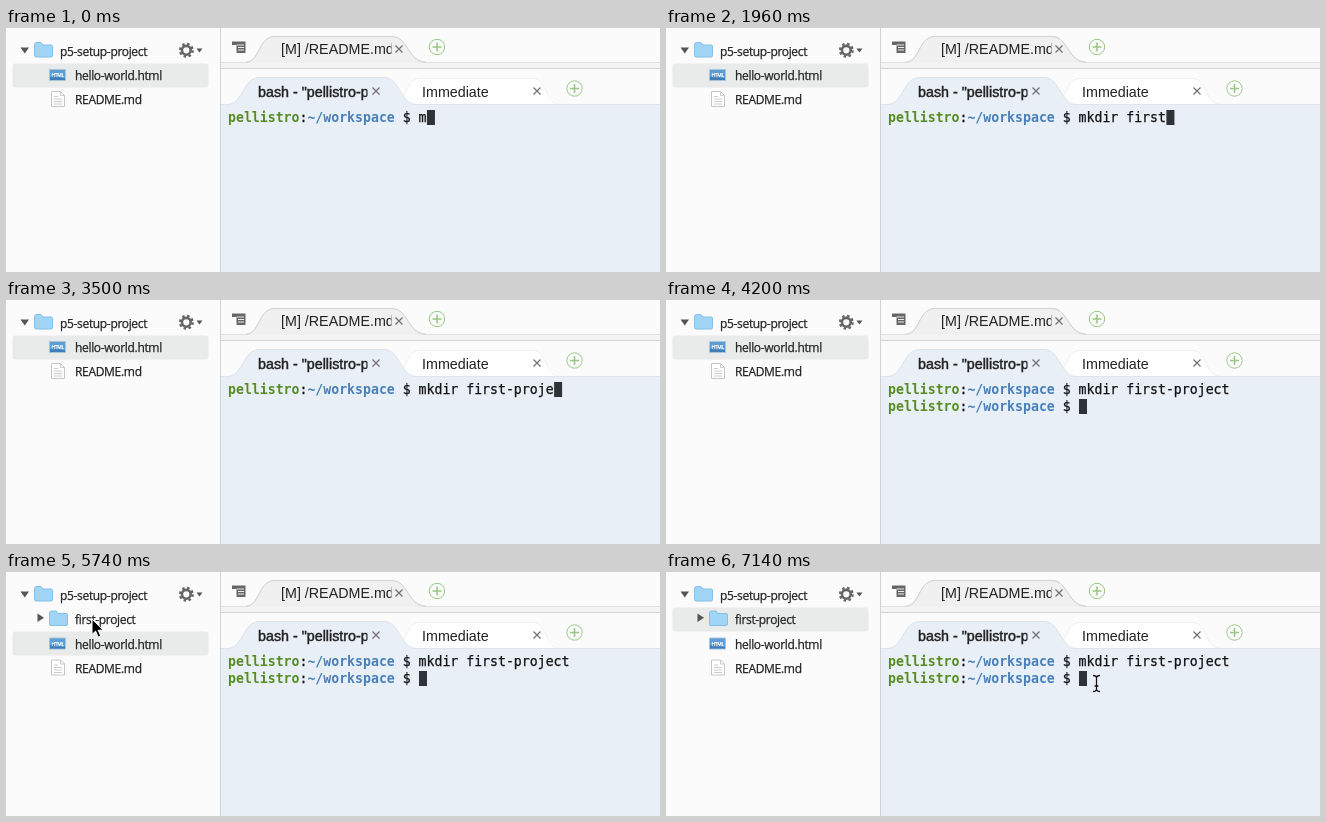
These frames come from a looping animation (654x244 px, 8 s). An HTML page:

```html
<!DOCTYPE html>
<html lang="en">
<head>
<meta charset="utf-8">
<title>Making a project folder</title>
<style>
html, body { margin: 0; width: 100%; height: 100%; overflow: hidden; background: #fbfbfb; }
svg { display: block; width: 654px; height: 244px; }
text { white-space: pre; fill: #222; }
.tree { font: 12px "Open Sans", "Noto Sans", sans-serif; letter-spacing: -.33px; }
.tree text { stroke: currentColor; stroke-width: .25px; color: #222; }
.tabs { font: 14.3px "Liberation Sans", Arial, sans-serif; }
.term { font: 13.2px "DejaVu Sans Mono", monospace; }
.term text { fill: #111; stroke: #111; stroke-width: .25px; }
.term .user, .term .path { font-weight: bold; stroke: none; }
.term .user { fill: #568c22; }
.term .path { fill: #4a7fb8; }
.picked text { fill: #fff; color: #fff; }
.picked path.twist { fill: #fff; }
.twist { fill: #555; }
.line { fill: none; stroke: #d2d2d2; }
</style>
</head>
<body>
<svg viewBox="0 0 654 244">
  <defs>
    <path id="folder" d="M.5 2.5q0-2 2-2h4.500l2 2.500h8q1.500 0 1.500 1.500v9q0 1.500-1.500 1.500h-15q-1.500 0-1.500-1.500z" fill="#a0d5f5" stroke="#82c0e8"/>
    <path id="close" d="M-3.500-3.500l7 7m0-7l-7 7" stroke="#707070" stroke-width="1.200"/>
    <g id="add" fill="none" stroke="#9ac785">
      <circle r="7.700"/>
      <path d="M-4.500 0h9M0-4.500v9" stroke-width="1.600"/>
    </g>
    <path id="beamShape" d="M-3.500-8Q0-8 0-5.500Q0-8 3.500-8M0-6V6M-3.500 8Q0 8 0 5.500Q0 8 3.500 8M-2 2.500h4"/>
    <clipPath id="clipTop"><path d="M270 8h115.500v26H270z"/></clipPath>
    <clipPath id="clipBash"><path d="M248 50h113.500v26H248z"/></clipPath>
  </defs>

  <path d="M0 0h654v244H0z" fill="#fbfbfb"/>

  <g class="tree">
    <rect id="mark" x="6.500" width="196" height="24" rx="3"/>
    <path class="twist" d="M14.500 19.500h8.500l-4.250 6z"/>
    <use href="#folder" x="28" y="14"/>
    <text x="54" y="27.500">p5-setup-project</text>
    <g fill="none" stroke="#666">
      <circle cx="180.300" cy="22.300" r="4.400" stroke-width="2.600"/>
      <circle cx="180.300" cy="22.300" r="6.300" stroke-width="2.400" stroke-dasharray="2.474"/>
    </g>
    <path d="M190.500 20.500h6l-3 4z" fill="#555"/>

    <g id="newRow">
      <path class="twist" d="M31.500 41.500v8.500l6.500-4.250z"/>
      <use href="#folder" x="43" y="38.500"/>
      <text x="69" y="52">first-project</text>
    </g>
    <g id="files">
      <path d="M43.500 41.500h16v11h-16z" fill="#5a9fd8" stroke="#a9c3d8"/>
      <path d="M44 49l5-2 10 3v2H44z" fill="#3b7fbf"/>
      <text x="45.500" y="49" style="font-size:5px;fill:#fff;color:#fff">HTML</text>
      <text x="69" y="52">hello-world.html</text>
      <path d="M45.500 63.500h9l4 4v11h-13z" fill="#fff" stroke="#c6c6c6"/>
      <path d="M54.500 63.500v4h4M48 68.500h4M48 71h8M48 73.500h8M48 76h8" fill="none" stroke="#ccc"/>
      <text x="69" y="76.300">README.md</text>
    </g>
  </g>

  <g class="tabs">
    <path d="M215 34h439v7H215z" fill="#f4f4f4"/>
    <path d="M215 34.500H240C254 34.500 252 8.500 269 8.500H386C402 8.500 402 34.500 420 34.500H654" fill="#f0f0f0" stroke="#e2e2e2"/>
    <path class="line" d="M240 34C254 34 252 8.500 269 8.500H386C402 8.500 402 34 420 34M215 40.500H654"/>
    <path d="M226 13.500h13.500v11.500h-9v-8h-4.500z" fill="#666"/>
    <path d="M230.500 17h7.500M232 19.500h6M232 22h6" stroke="#fbfbfb" stroke-width=".9"/>
    <text x="275" y="26" clip-path="url(#clipTop)">[M] /README.md</text>
    <use href="#close" x="393" y="21"/>
    <use href="#add" x="431" y="19"/>

    <path d="M386 76.500C402 76.500 398 50.500 414 50.500H526C542 50.500 538 76.500 556 76.500z" fill="#fff" stroke="#f0f0f0"/>
    <path d="M215 76h439v168H215z" fill="#e9eff7"/>
    <path class="line" d="M215 76.500H654" style="stroke:#dfe5eb"/>
    <path d="M215 77H221C238 77 236 49.500 254 49.500H378C394 49.500 394 77 411 77z" fill="#e9eff7"/>
    <path class="line" d="M221 76.500C238 76.500 236 49.500 254 49.500H378C394 49.500 394 76.500 411 76.500" style="stroke:#dce2e8"/>
    <text x="252" y="69" clip-path="url(#clipBash)" stroke="#222" stroke-width=".45">bash - "pellistro-project"</text>
    <text x="416" y="69">Immediate</text>
    <use href="#close" x="370" y="63"/>
    <use href="#close" x="531" y="63"/>
    <use href="#add" x="568.500" y="60.500"/>
  </g>
  <path class="line" d="M214.500 0V244"/>

  <g class="term">
    <text x="222" y="94"><tspan class="user">pellistro</tspan>:<tspan class="path">~/workspace</tspan> $ <tspan id="typed"></tspan></text>
    <text id="prompt" x="222" y="111"><tspan class="user">pellistro</tspan>:<tspan class="path">~/workspace</tspan> $ </text>
    <rect id="caret"/>
  </g>

  <path id="arrow" d="M0 0v15.500l3.600-3.400 2.600 6 2.600-1.100-2.600-5.800h5z" fill="#000" stroke="#fff"/>
  <g id="beam" fill="none">
    <use href="#beamShape" stroke="#fff" stroke-width="2.400"/>
    <use href="#beamShape" stroke="#111" stroke-width="1.300"/>
  </g>
</svg>
<script>
const LOOP = 8000, TICK = 140, CELL = 7.947;
const COMMAND = "mkdir first-project";
const ENTER = 4200, CREATED = 4480, POINT = 4900, CLICK = 6020, LEAVE = 6300, FOCUS = 7140;
// Bursts of typing: start time and number of keys
const BURSTS = [[0, 6], [1400, 5], [2660, 1], [2940, 7]];
// Pointer stops on the way back to the terminal, one per tick
const RETURN = [[150, 68], [275, 94], [373.5, 106.5], [410, 112], [426, 113], [431, 112], [430.5, 111.5]];

const el = id => document.getElementById(id);
const set = (id, attrs) => {
  for (const name in attrs) el(id).setAttribute(name, attrs[name]);
};
const show = (id, on) => set(id, { visibility: on ? "visible" : "hidden" });
const place = (id, [x, y]) => set(id, { transform: `translate(${x} ${y})` });

function keysAt(t) {
  return BURSTS.reduce((sum, [start, count]) =>
    sum + Math.max(0, Math.min(count, Math.floor((t - start) / TICK) + 1)), 0);
}

function pointerAt(t) {
  if (t >= LEAVE) return RETURN[Math.min(6, Math.floor((t - LEAVE) / TICK))];
  const p = Math.min(1, Math.floor((t - POINT) / TICK) / 6);
  const rest = (1 - p) ** 2;
  return [86 + 44 * rest, 47 + 104 * rest];
}

function draw(t) {
  const keys = keysAt(t), entered = t >= ENTER, created = t >= CREATED;
  const clicked = t >= CLICK, blurred = clicked && t < FOCUS;

  el("typed").textContent = COMMAND.slice(0, keys);
  show("prompt", entered);
  const x = 413 + (entered ? 0 : keys * CELL), y = entered ? 99 : 82;
  set("caret", blurred
    ? { x: 412.5, y: y - .5, width: 9, height: 16, fill: "none", stroke: "#8b9096" }
    : { x, y, width: 8, height: 15, fill: "#2e3338", stroke: "none" });

  show("newRow", created);
  set("newRow", { class: blurred ? "picked" : "" });
  place("files", [0, created ? 24.5 : 0]);
  set("mark", { y: created && !clicked ? 59.5 : 35.5, fill: blurred ? "#5ca8fb" : "#e9eaea" });

  const overTerm = t >= LEAVE + TICK;
  show("arrow", t >= POINT && !overTerm);
  show("beam", overTerm);
  if (t >= POINT) place(overTerm ? "beam" : "arrow", pointerAt(t));
}

const start = performance.now();
function frame() {
  draw((performance.now() - start) % LOOP);
  requestAnimationFrame(frame);
}
frame();
</script>
</body>
</html>
```
